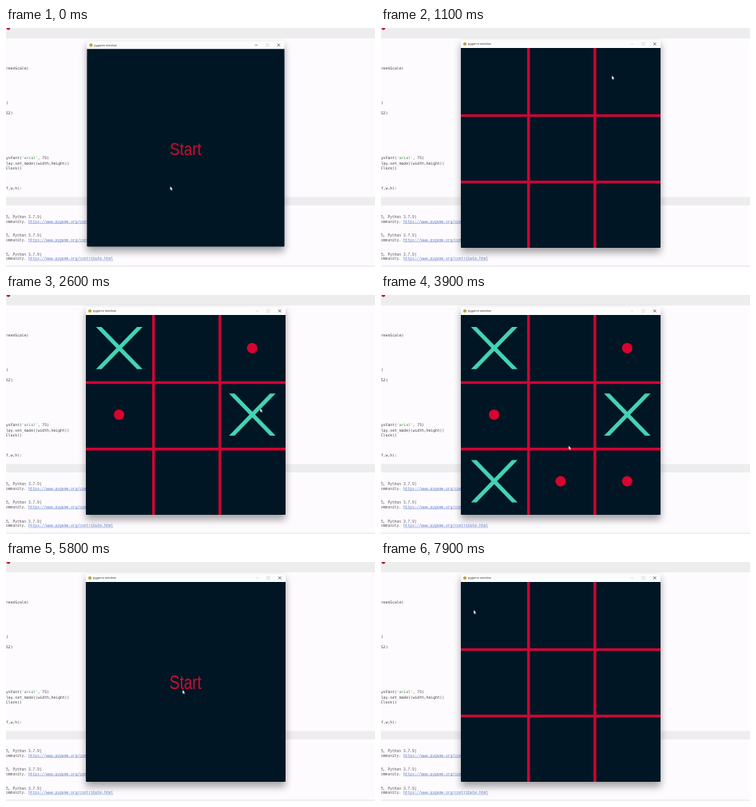
An HTML page that plays this animation: 462 px wide and 299 px high, repeating every 8000 ms.

```html
<!DOCTYPE html>
<html lang="en">
<head>
<meta charset="utf-8">
<title>Tic-tac-toe</title>
<style>
html, body { margin: 0; width: 100%; height: 100%; overflow: hidden; background: #fdfbfe; }
svg { display: block; width: 462px; height: 299px; }
text { white-space: pre; }
.code { font: 4.72px "DejaVu Sans Mono", monospace; fill: #3c3a40; }
.shell { font: 4.68px "Liberation Mono", monospace; fill: #57545c; }
.link { fill: #6480cc; text-decoration: underline; }
.title { font: 3.8px "Open Sans", sans-serif; fill: #333; }
.start { font: 23.2px "Liberation Sans", sans-serif; fill: #c8102e; }
</style>
</head>
<body>
<svg viewBox="0 0 462 299">
  <defs>
    <filter id="blur" x="-15%" y="-15%" width="130%" height="130%"><feGaussianBlur stdDeviation="5"/></filter>
  </defs>
  <path d="M0 0H462V13H0zM0 211.5H462V222H0z" fill="#eeedee"/>
  <path d="M0 297H462V299H0z" fill="#efeef0"/>
  <circle cx="3" cy="0" r="2.4" fill="#c8102e"/>
  <g id="desk"></g>
  <g id="win">
    <rect x="100" y="20" width="250" height="261" fill="#000" opacity=".36" filter="url(#blur)"/>
    <rect x="100" y="15" width="250" height="20" rx="1" fill="#fcfcfc"/>
    <circle cx="105" cy="20" r="2.1" fill="#b5a23c"/>
    <text class="title" x="109" y="21.4">pygame window</text>
    <g fill="none" stroke="#ccc" stroke-width=".6">
      <path id="min" d="M312.5 20H316"/>
      <path d="M326.8 18.3H330V21.5H326.8z"/>
      <path d="M341 18.2L344.4 21.6M344.4 18.2L341 21.6" stroke="#333" stroke-width=".7"/>
    </g>
    <path d="M100 25H350V274q0 1-1 1H101q-1 0-1-1z" fill="#011624"/>
    <text class="start" id="start" transform="translate(204.7 159) scale(.82 1)">Start</text>
    <g id="game">
      <path d="M184.7 25V275M267.8 25V275M100 109.6H350M100 192.8H350" stroke="#d00433" stroke-width="3.4"/>
      <g id="marks"></g>
    </g>
  </g>
  <path id="arrow" d="M0 0V4.8L1.1 3.9L1.9 5.6L2.7 5.2L2 3.6H3.4z" fill="#fff" stroke="#222" stroke-width=".25"/>
  <path id="beam" d="M-1 -2.6H1M0 -2.6V2.6M-1 2.6H1" stroke="#777" stroke-width=".5"/>
</svg>
<script>
const $ = id => document.getElementById(id);
const LOOP = 8000, STEP = 100, CELL = 83.3;
const START = 600, END = 5800, RESTART = 7400;

// Editor and shell text behind the window
const text = (cls, y, s) => `<text class="${cls}" x="0" y="${y}">${s}</text>`;
const code = {
  51.5: "reenScale)",
  94.7: ")",
  107.5: "52)",
  164: `ysFont(<tspan fill="#4a8a4a">'arial'</tspan>, 75)`,
  170.5: "lay.set_mode((width,height))",
  176.8: "Clock()",
  201.7: "f,w,h):"
};
let desk = Object.entries(code).map(([y, s]) => text("code", y, s)).join("");
for (let y = 238.3; y < 290; y += 23.1)
  desk += text("shell", y, "5, Python 3.7.9)") +
    text("shell", y + 5.2, 'ommunity. <tspan class="link">https://www.pygame.org/contribute.html</tspan>');
$("desk").innerHTML = desk;

// Cells 0 to 8 in order of play; O begins and the players alternate at an even pace
const moves = [..."203586741"].map((cell, i) => ({
  t: 1300 + i * 390,
  x: 141.6 + cell % 3 * CELL,
  y: 66.4 + Math.floor(cell / 3) * CELL
}));
const shapes = [
  '<circle r="6.5" fill="#d8042f"/>',
  '<path d="M-29 -26.4H-22L29.4 26.4H22.4zM22.4 -26.4H29.4L-22 26.4H-29z" fill="#43d3b3"/>'
];
$("marks").innerHTML = moves.map(({ x, y }, i) =>
  `<g transform="translate(${x} ${y})">${shapes[i % 2]}</g>`).join("");
const marks = [...$("marks").children];

// Pointer stops: time, x, y; it rests briefly on each cell after a move
const stops = [
  [0, 205.5, 198], [100, 205.5, 198], [500, 228, 153], [700, 228, 153], [1100, 289, 59.5],
  ...moves.flatMap(({ t, x, y }) => [[t, x + 10, y - 8], [t + 150, x + 10, y - 8]]),
  [4900, 392, 85], [5000, 392, 85], [5400, 221, 160], [6200, 221, 160],
  [6500, 234, 151], [RESTART, 234, 151], [7900, 116, 60], [LOOP, 116, 60]
];

function pointer(t) {
  const i = stops.findIndex(s => s[0] > t);
  const [t0, x0, y0] = stops[i - 1], [t1, x1, y1] = stops[i];
  const u = (t - t0) / (t1 - t0), e = u * u * (3 - 2 * u);
  return [x0 + (x1 - x0) * e, y0 + (y1 - y0) * e];
}

const show = (el, on) => el.setAttribute("visibility", on ? "inherit" : "hidden");

function draw(now) {
  const t = Math.floor(now % LOOP / STEP) * STEP;
  const opening = t < 100;
  const playing = t >= START && t < END || t >= RESTART;
  $("win").setAttribute("transform", opening ? "translate(225 145) scale(.989) translate(-225 -145)" : "");
  $("min").setAttribute("stroke", opening ? "#555" : "#ccc");
  show($("start"), !playing);
  show($("game"), playing);
  marks.forEach((m, i) => show(m, t >= moves[i].t && t < END));
  const [x, y] = pointer(t), outside = x > 350;
  for (const id of ["arrow", "beam"]) $(id).setAttribute("transform", `translate(${x} ${y})`);
  show($("arrow"), !outside);
  show($("beam"), outside);
}

const begin = performance.now();
function tick() {
  draw(performance.now() - begin);
  requestAnimationFrame(tick);
}
tick();
</script>
</body>
</html>
```
